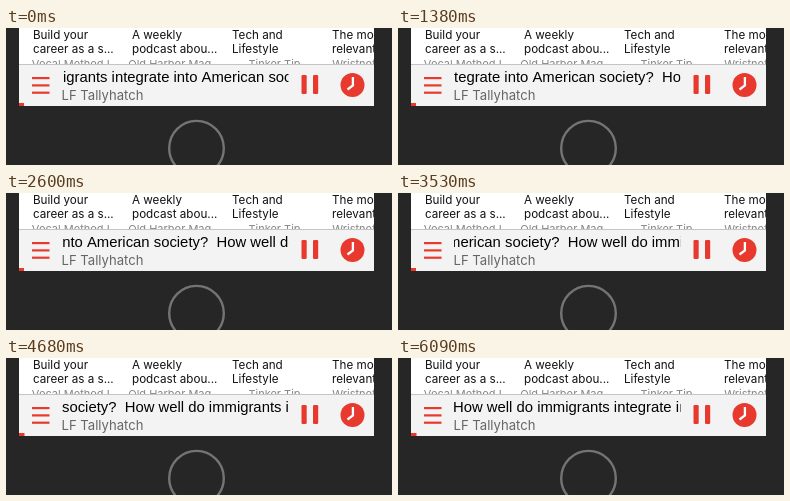
An HTML page with a canvas that plays this animation: 386 by 137 pixels, repeating every 8000 ms.

```html
<!DOCTYPE html>
<html lang="en">
<head>
<meta charset="utf-8">
<title>Podcast player bar</title>
<style>
  html, body { margin: 0; width: 100%; height: 100%; overflow: hidden; background: #262626; }
  canvas { display: block; width: 386px; height: 137px; }
</style>
</head>
<body>
<canvas id="stage"></canvas>
<script>
const W = 386, H = 137, LOOP = 8000;
const RED = '#e8392f';
const FACE = 'Inter, Roboto, sans-serif';
const TITLE_FACE = '"Liberation Sans", Arial, sans-serif';
const TITLE = 'How well do immigrants integrate into American society?\u00a0\u00a0';

// Marquee: even steps to the left until the title rests at its start.
const STEPS = 106, STEP_MS = 57.43, STEP_PX = 2.548, REST_X = 55;

const cards = [
  { x: 27, lines: ['Build your', 'career as a s...'], author: 'Vocal Method I...' },
  { x: 126, lines: ['A weekly', 'podcast abou...'], author: 'Old Harbor Mag...' },
  { x: 226, lines: ['Tech and', 'Lifestyle'], author: 'Tinker Tip' },
  { x: 326, lines: ['The most', 'relevant'], author: 'Wristnotes Daily' }
];

const canvas = document.getElementById('stage');
const ctx = canvas.getContext('2d');
const ratio = window.devicePixelRatio || 1;
canvas.width = W * ratio;
canvas.height = H * ratio;

function rect(x, y, w, h, color, radius = 0) {
  ctx.fillStyle = color;
  ctx.beginPath();
  ctx.roundRect(x, y, w, h, radius);
  ctx.fill();
}

function text(str, x, y, size, color, align = 'left', face = FACE) {
  ctx.font = `${size}px ${face}`;
  ctx.textAlign = align;
  ctx.fillStyle = color;
  ctx.fillText(str, x, y);
}

function clipped(x, y, w, h, draw) {
  ctx.save();
  ctx.beginPath();
  ctx.rect(x, y, w, h);
  ctx.clip();
  draw();
  ctx.restore();
}

function drawCards() {
  rect(13, 0, 355, 36.5, '#ffffff');
  clipped(13, 0, 355, 36.5, () => {
    for (const { x, lines, author } of cards) {
      lines.forEach((line, i) => text(line, x, 11 + 14 * i, 11.65, '#111111'));
      text(author, x + 42.5, 39.5, 11, '#858585', 'center');
    }
  });
}

function drawTitle(t) {
  const step = Math.max(0, Math.min(STEPS, Math.floor((t - 50) / STEP_MS) + 1));
  const x = REST_X + (STEPS - step) * STEP_PX;
  const drawAt = left => text(TITLE, left, 54, 14.85, '#000000', 'left', TITLE_FACE);
  clipped(56, 40, 226.5, 20, () => {
    drawAt(x);
    drawAt(x - ctx.measureText(TITLE).width);
  });
}

function drawClock() {
  ctx.fillStyle = RED;
  ctx.beginPath();
  ctx.arc(346.5, 57, 12, 0, Math.PI * 2);
  ctx.fill();
  ctx.strokeStyle = '#ffffff';
  ctx.lineWidth = 2.3;
  ctx.beginPath();
  ctx.moveTo(346.9, 49);
  ctx.lineTo(346.9, 57.5);
  ctx.lineTo(341.5, 61.5);
  ctx.stroke();
}

function drawBar(t) {
  rect(13, 36, 355, 42, '#f3f3f3');
  rect(13, 36, 355, 1, '#c4c4c4');
  for (let i = 0; i < 3; i++) rect(26, 49 + 7.3 * i, 17.5, 2.2, RED);
  drawTitle(t);
  text('LF Tallyhatch', 55.5, 72, 13.1, '#666666');
  for (const x of [295.5, 307]) rect(x, 47, 5.2, 19, RED, 1.2);
  drawClock();
  rect(13, 75, t < 3700 ? 5 : 5.5, 3, RED);
}

function drawHomeButton() {
  ctx.strokeStyle = '#747474';
  ctx.lineWidth = 2.4;
  ctx.beginPath();
  ctx.arc(190.5, 120.2, 27.3, 0, Math.PI * 2);
  ctx.stroke();
}

function frame(now) {
  const t = now % LOOP;
  ctx.setTransform(ratio, 0, 0, ratio, 0, 0);
  rect(0, 0, W, H, '#262626');
  drawCards();
  drawBar(t);
  drawHomeButton();
  requestAnimationFrame(() => frame(performance.now() - start));
}

const start = performance.now();
frame(0);
</script>
</body>
</html>
```
